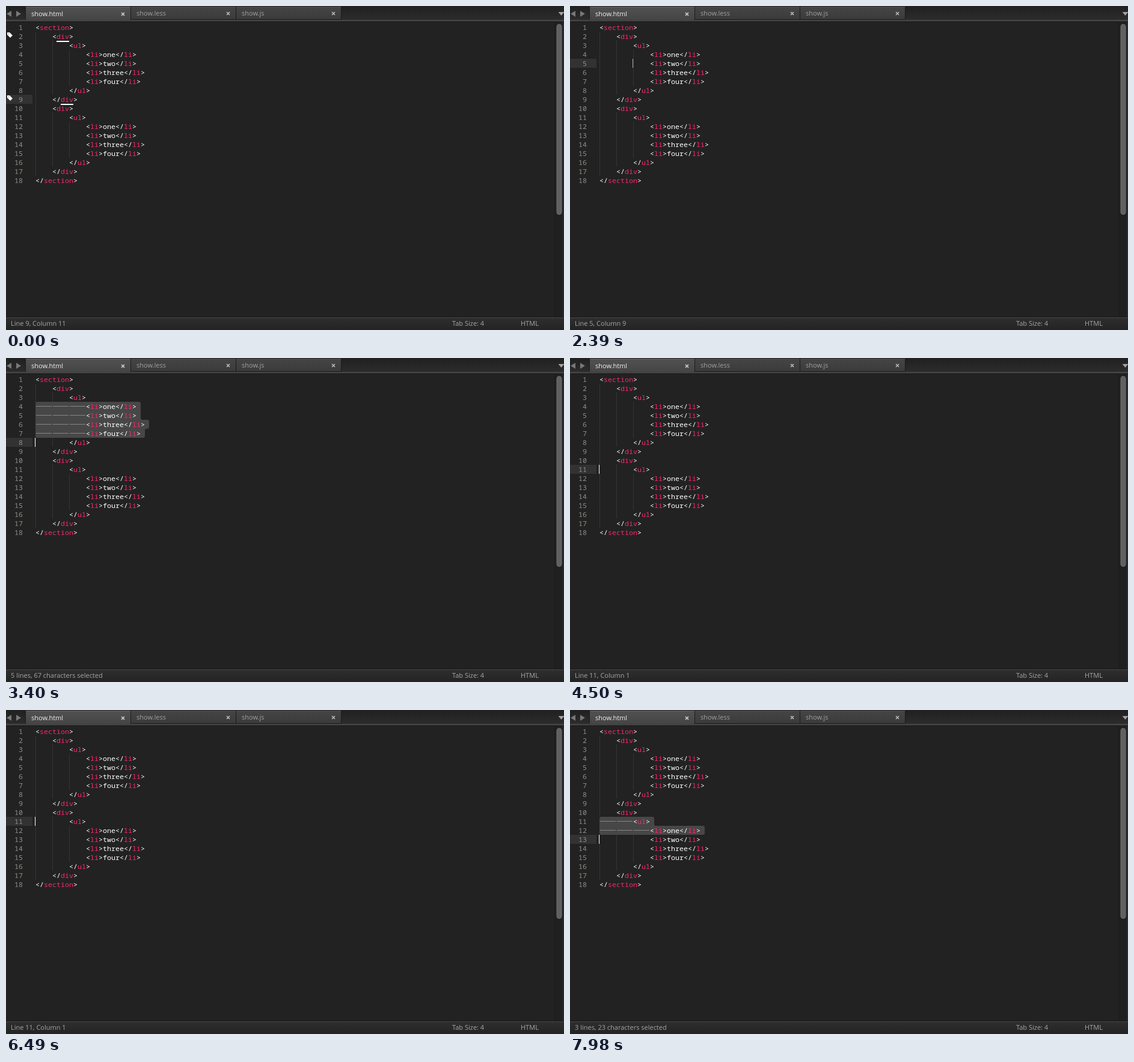
An HTML page with a canvas that plays this animation: 928x540 px, repeating every 8 s.

```html
<!DOCTYPE html>
<html lang="en">
<head>
<meta charset="utf-8">
<title>Editor selection</title>
<style>
html, body { margin: 0; width: 100%; height: 100%; overflow: hidden; background: #222; }
canvas { display: block; }
</style>
</head>
<body>
<canvas width="928" height="540"></canvas>
<script>
const ctx = document.querySelector('canvas').getContext('2d', { alpha: false });
const LOOP = 8000, LEFT = 49, CHAR = 7, ROW = 15, TAB = 4;
const MONO = '11.667px "Noto Sans Mono", "DejaVu Sans Mono", monospace';
const SANS = '11px "Open Sans", "Noto Sans", sans-serif';
const WHITE = '#fff', GREY = '#a6a6a6', DARK = '#191919', PAGE = '#222';

const block = ['\t<div>', '\t\t<ul>',
  ...['one', 'two', 'three', 'four'].map(word => `\t\t\t<li>${word}</li>`),
  '\t\t</ul>', '\t</div>'];
const lines = ['<section>', ...block, ...block, '</section>'];

const tabsIn = text => text.lastIndexOf('\t') + 1;
const rowTop = line => 28 + ROW * (line - 1);
const textLeft = text => LEFT + tabsIn(text) * TAB * CHAR;
const textRight = text => textLeft(text) + (text.length - tabsIn(text)) * CHAR;

const timeline = [];
let goal = 11;

// The caret keeps its goal column but snaps back to a tab stop inside an indent.
function columnOn(line) {
  const indent = tabsIn(lines[line - 1]) * TAB, offset = goal - 1;
  return 1 + (offset < indent ? offset - offset % TAB : offset);
}

function move(time, line, first) {
  timeline.push({ time, line, first, column: columnOn(line), opacity: 1 });
}

function run(from, to, start, end, first) {
  const count = Math.abs(to - from), direction = Math.sign(to - from);
  for (let i = 0; i <= count; i++)
    move(start + (end - start) * i / count, from + i * direction, first);
}

function fade(time, ...levels) {
  levels.forEach((opacity, i) =>
    timeline.push({ ...timeline.at(-1), time: time + i * 145, opacity }));
}

move(0, 9);
fade(0, 0);
fade(400, .5);
run(8, 5, 530, 910);
run(4, 3, 1220, 1340);
run(4, 5, 1770, 2020);
fade(2390, .65);
move(2540, 4);
goal = 1;
move(2820, 4);
run(5, 8, 2965, 3400, 4);
fade(3830, .5, 0);
run(9, 10, 4100, 4230);
run(11, 12, 4500, 4630);
fade(5030, .5, 0);
run(13, 16, 5490, 5895, 12);
fade(6340, .5);
run(11, 10, 6490, 6740);
move(7130, 11);
fade(7530, .5);
run(12, 13, 7680, 7980, 11);

function rect(x, y, w, h, fill) {
  ctx.fillStyle = fill;
  ctx.fillRect(x, y, w, h);
}

function triangle(x, y, dx, dy, fill) {
  const half = 5;
  ctx.beginPath();
  ctx.moveTo(x + dx, y + dy);
  ctx.lineTo(x + (dy && half), y + (dx && half));
  ctx.lineTo(x - (dy && half), y - (dx && half));
  ctx.fillStyle = fill;
  ctx.fill();
}

function label(text, x, y, fill = GREY, font = SANS) {
  ctx.font = font;
  ctx.fillStyle = fill;
  ctx.fillText(text, x, y);
}

function vertical(y, height, from, to) {
  const gradient = ctx.createLinearGradient(0, y, 0, y + height);
  gradient.addColorStop(0, from);
  gradient.addColorStop(1, to);
  return gradient;
}

function drawTab(name, index) {
  const active = index === 0, x = 33 + index * 175;
  const y = active ? 17 : 16, height = active ? 23 : 21;
  rect(x - 1, 2, 176, 21, '#1b1b1b');
  rect(x, 1, 174, height, active ? vertical(1, height, '#525252', '#444') : vertical(1, height, '#454545', '#3b3b3b'));
  rect(x, 1, 174, 1, active ? '#626262' : '#4c4c4c');
  label(name, x + 9, y, active ? '#f0f0f0' : '#a0a0a0');
  ctx.strokeStyle = active ? '#d0d0d0' : '#b8b8b8';
  ctx.lineWidth = 1.7;
  ctx.beginPath();
  for (const d of [-2.5, 2.5]) {
    ctx.moveTo(x + 161.5 + d, y - 6);
    ctx.lineTo(x + 161.5 - d, y - 1);
  }
  ctx.stroke();
}

function drawChrome() {
  rect(0, 0, 928, 23, vertical(0, 23, '#202020', '#2c2c2c'));
  rect(0, 23, 928, 2, '#444');
  rect(0, 25, 928, 1, '#343434');
  rect(0, 26, 928, 1, DARK);
  triangle(9, 13, -8, 0, '#787878');
  triangle(17, 13, 8, 0, '#787878');
  ['show.html', 'show.less', 'show.js'].forEach(drawTab);
  triangle(923.5, 10, 0, 6, '#a0a0a0');

  rect(912, 27, 16, 491, '#202020');
  rect(912, 27, 1, 491, '#1c1c1c');
  rect(926, 27, 2, 491, '#2b2b2b');
  ctx.beginPath();
  ctx.roundRect(916, 30.5, 8, 317, 4);
  ctx.fillStyle = '#606060';
  ctx.fill();
  ctx.strokeStyle = '#707070';
  ctx.lineWidth = 1;
  ctx.stroke();

  rect(0, 518, 928, 1, DARK);
  rect(0, 519, 928, 1, '#484848');
  rect(0, 520, 928, 20, vertical(520, 20, '#2e2e2e', '#232323'));
  label('Tab Size: 4', 742, 533);
  label('HTML', 856, 533);
}

function drawSelection(first, end) {
  const radius = 3, top = rowTop(first);
  const corners = [];
  for (let line = first; line < end; line++) {
    const x = textRight(lines[line - 1]) + CHAR;
    // Equal neighbouring edges need no corner between them.
    if (corners.length && corners.at(-1)[0] === x) corners.pop();
    else corners.push([x, rowTop(line)]);
    corners.push([x, rowTop(line + 1)]);
  }
  corners.push([LEFT, rowTop(end)], [LEFT, top]);
  ctx.beginPath();
  ctx.moveTo(LEFT + radius, top);
  corners.forEach(([x, y], i) => {
    const next = corners[i + 1] || [LEFT + radius, top];
    ctx.arcTo(x, y, ...next, radius);
  });
  ctx.closePath();
  ctx.fillStyle = '#474747';
  ctx.fill();
}

function drawLine(text, line, active, selected) {
  const top = rowTop(line), baseline = top + 12;
  if (active) rect(0, top, 44, ROW, '#323232');
  const number = String(line);
  label(number, 28 - number.length * CHAR, baseline, '#8f908a', MONO);

  for (let tab = 0; tab < tabsIn(text); tab++) {
    const x = LEFT + tab * TAB * CHAR;
    if (selected) rect(x + 1, top + 7, 26, 1, '#858585');
    else for (let y = top + top % 2; y < top + ROW; y += 2) rect(x, y, 1, 1, '#474747');
  }

  let x = textLeft(text), previous = '';
  for (const token of text.trim().split(/(<\/?|>)/).filter(Boolean)) {
    label(token, x, baseline, previous[0] === '<' ? '#f92672' : WHITE, MONO);
    x += token.length * CHAR;
    previous = token;
  }
}

function drawTagMatch(line) {
  const text = lines[line - 1], y = rowTop(line);
  const name = text.match(/\w+/);
  const x = textLeft(text) + (name.index - tabsIn(text)) * CHAR;
  rect(x, y + 15, name[0].length * CHAR, 2, WHITE);
  rect(2, y + 1, 4, 4, WHITE);
  ctx.lineWidth = 5.5;
  ctx.strokeStyle = WHITE;
  ctx.beginPath();
  ctx.moveTo(4, y + 3);
  ctx.lineTo(9, y + 8);
  ctx.stroke();
  rect(4, y + 3, 1, 1, PAGE);
}

function statusText({ line, column, first }) {
  if (!first) return `Line ${line}, Column ${column}`;
  const count = lines.slice(first - 1, line - 1).join('\n').length + 1;
  return `${line - first + 1} lines, ${count} characters selected`;
}

function draw(time) {
  const state = timeline.findLast(entry => entry.time <= time);
  const { line, column, opacity, first } = state;
  rect(0, 0, 928, 540, PAGE);
  drawChrome();
  if (first) drawSelection(first, line);
  lines.forEach((text, i) => {
    const n = i + 1;
    drawLine(text, n, n === line, first && n >= first && n < line);
  });
  if (column === 11) (line === 9 ? [2, 9] : [3, 8]).forEach(drawTagMatch);
  ctx.globalAlpha = opacity;
  rect(LEFT - 1 + (column - 1) * CHAR, rowTop(line), 1, ROW, '#f8f8f0');
  ctx.globalAlpha = 1;
  label(statusText(state), 8, 533);
}

function tick() {
  draw(performance.now() % LOOP);
  requestAnimationFrame(tick);
}
tick();
</script>
</body>
</html>
```
